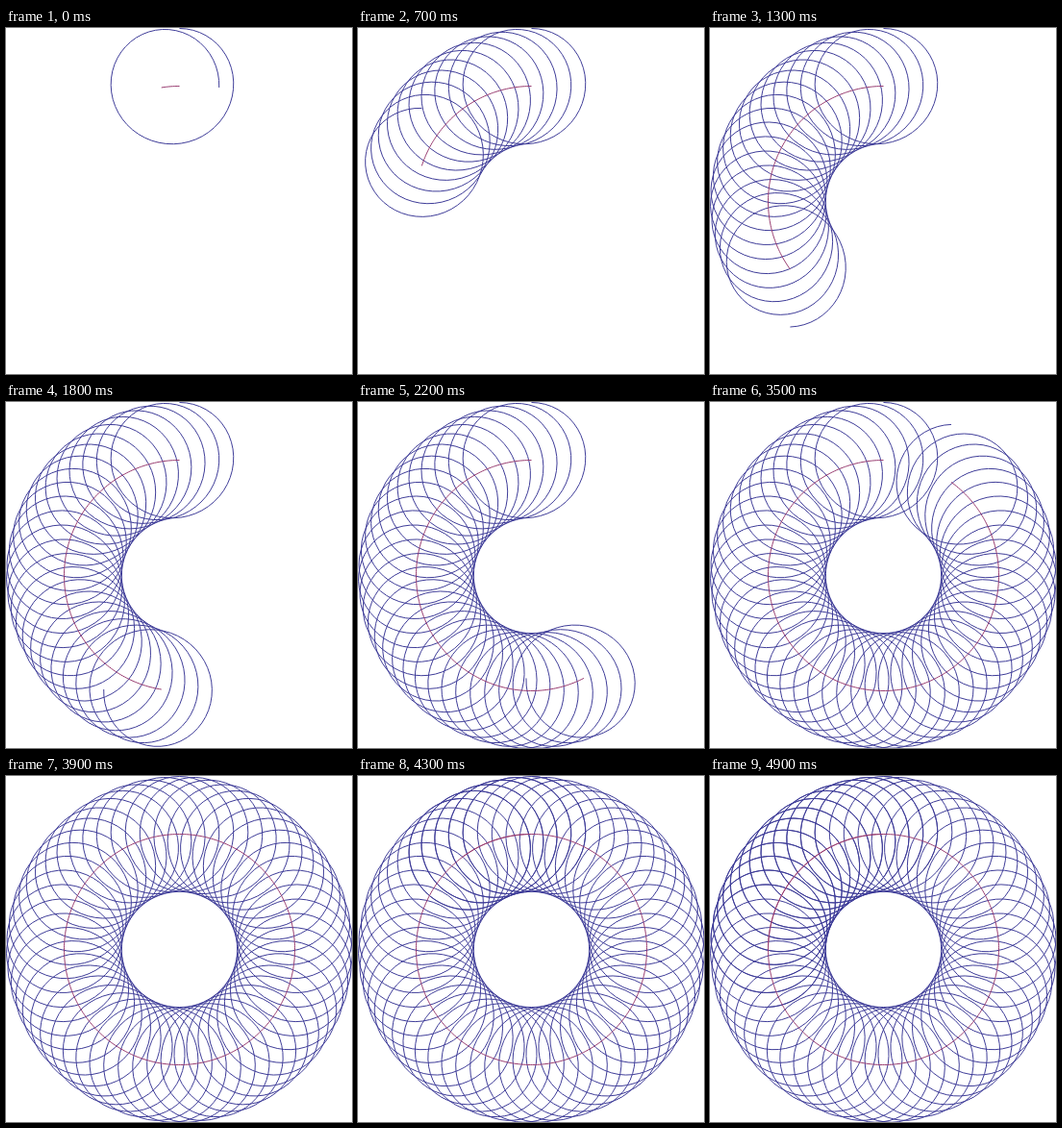
These frames come from a looping animation (360x360 px, 5 s). An HTML page with a canvas:

```html
<!DOCTYPE html>
<html lang="en">
<head>
<meta charset="utf-8">
<title>Epitrochoid</title>
<style>
  html, body { margin: 0; width: 100%; height: 100%; overflow: hidden; background: #fff; }
  canvas { display: block; }
</style>
</head>
<body>
<canvas id="stage" width="360" height="360"></canvas>
<script>
const ctx = document.getElementById('stage').getContext('2d');
const CENTER = 180.5, CARRIER = 120, WHEEL = 60, SPIN = 50;
const STEP_MS = 100, STEPS = 50, STEP_ANGLE = Math.PI / 20;
const TURN = 2 * Math.PI;

// Carrier runs counter-clockwise from the top, the wheel clockwise.
function trace(from, to, wheel, color, segment) {
  ctx.strokeStyle = color;
  ctx.beginPath();
  const count = Math.ceil((to - from) / segment);
  for (let i = 0; i <= count; i++) {
    const a = from + (to - from) * i / count;
    ctx.lineTo(
      CENTER - CARRIER * Math.sin(a) + wheel * Math.sin(SPIN * a),
      CENTER - CARRIER * Math.cos(a) - wheel * Math.cos(SPIN * a)
    );
  }
  ctx.stroke();
}

// Each turn is its own stroke, so the second pass darkens the first.
function traceTurns(end, wheel, color, segment) {
  for (let from = 0; from < end - 1e-6; from += TURN) {
    trace(from, Math.min(end, from + TURN), wheel, color, segment);
  }
}

function draw(step) {
  const end = (step + 1) * STEP_ANGLE;
  ctx.fillStyle = '#fff';
  ctx.fillRect(0, 0, 360, 360);
  ctx.lineWidth = 1;
  ctx.lineJoin = 'round';
  traceTurns(end, WHEEL, '#3f3d99', 0.0025);
  traceTurns(end, 0, '#993d71', 0.02);
}

let shown = -1;
const start = performance.now();
function tick() {
  const step = Math.floor((performance.now() - start) / STEP_MS) % STEPS;
  if (step !== shown) draw(shown = step);
  requestAnimationFrame(tick);
}
tick();
</script>
</body>
</html>
```
